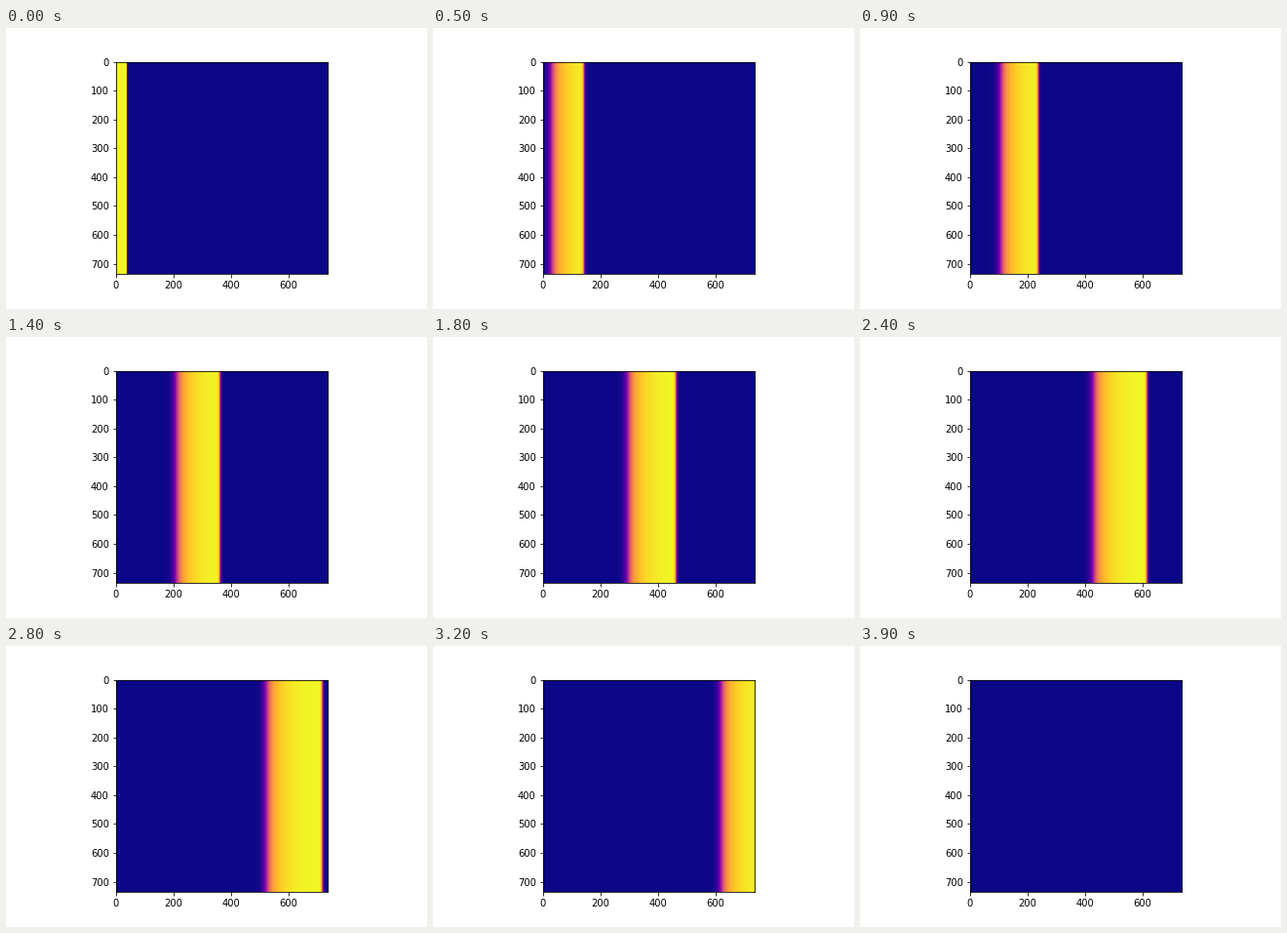
A matplotlib script for the animation above (4800 ms loop, 432 by 288 pixels).

```python
import numpy as np
import matplotlib.pyplot as plt
from matplotlib.animation import FuncAnimation

SIZE = 736           # cells per side
STIM = 37            # cells excited at the start
FRAMES, STEP_MS = 48, 100
FRONT_WIDTH, BACK_WIDTH = 2.2, 7.0
RECOVERY = 42        # cells over which the plateau sinks

cells = np.arange(SIZE)


def sigmoid(z):
    return 1 / (1 + np.exp(-np.clip(z, -50, 50)))


def front(t):
    """Leaves the stimulus slowly, then settles at a constant speed."""
    return 25.5 * t + STIM * np.exp(-t / 5)


def back(t):
    """Trails the front and gradually catches up in speed."""
    return -67 + 18.1 * t + 0.1 * t ** 2


def potential(t):
    """Potential along x: steep front, slowly sinking plateau, softer back."""
    if t == 0:
        return (cells < STIM).astype(float)
    behind = cells - back(t)
    plateau = 1 - 0.38 * np.exp(-np.maximum(behind, 0) / RECOVERY)
    rise = sigmoid((front(t) - cells) / FRONT_WIDTH)
    fall = sigmoid(behind / BACK_WIDTH)
    return plateau * rise * fall


def field(t):
    return np.tile(potential(t), (SIZE, 1))


plt.rcParams.update({"font.family": "DejaVu Sans", "font.size": 10})
fig, ax = plt.subplots(figsize=(6, 4), dpi=72, facecolor="white")
fig.subplots_adjust(left=0.125, right=0.9, bottom=0.125, top=0.88)
image = ax.imshow(field(0), cmap="plasma", vmin=0, vmax=1)


def update(t):
    image.set_data(field(t))
    return [image]


anim = FuncAnimation(fig, update, frames=FRAMES, interval=STEP_MS,
                     repeat=True, repeat_delay=0)
plt.show()
```
